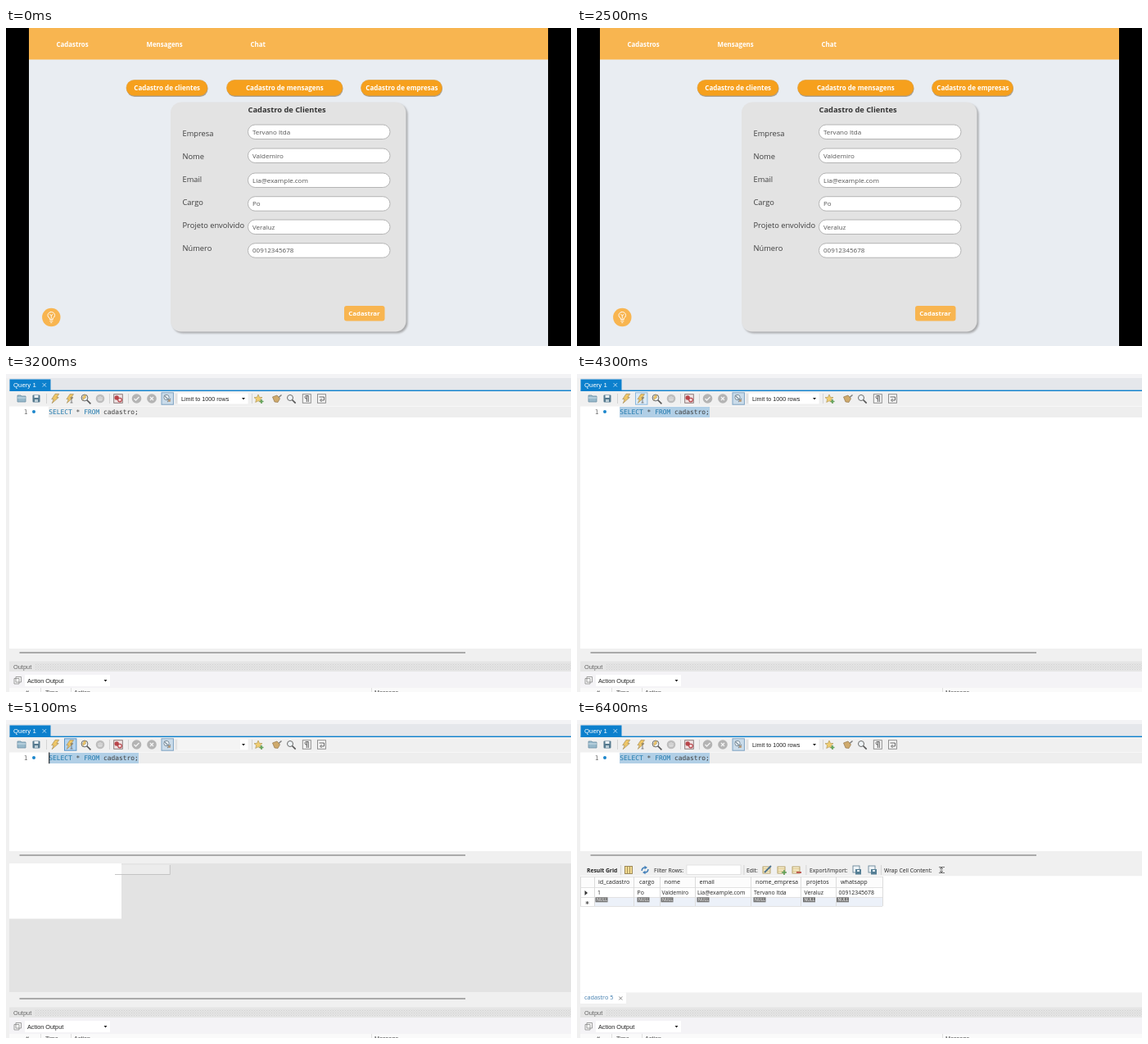
An HTML page for the animation above (6600 ms loop, 690x388 px).

```html
<!DOCTYPE html>
<html lang="pt">
<head>
<meta charset="utf-8">
<title>Cadastro</title>
<style>
html, body { margin: 0; width: 100%; height: 100%; overflow: hidden; background: #000; }
svg { display: block; width: 100%; height: 100%; }
text { white-space: pre; }
.ui { font-family: "Open Sans", "Noto Sans", sans-serif; }
.win { font-family: "Liberation Sans", Arial, sans-serif; }
.code { font-family: "DejaVu Sans Mono", monospace; }
.b { font-weight: 700; }
</style>
</head>
<body>
<svg id="stage" viewBox="0 0 690 388" xmlns="http://www.w3.org/2000/svg"></svg>
<script>
const LOOP = 6600;
const person = 'Valdemiro', company = 'Tervano ltda', mail = 'Lia@example.com',
  project = 'Veraluz', phone = '00912345678';

const rect = (x, y, w, h, fill, more = '') =>
  `<rect x="${x}" y="${y}" width="${w}" height="${h}" fill="${fill}" ${more}/>`;
const text = (x, y, size, fill, str, cls = 'ui') =>
  `<text x="${x}" y="${y}" font-size="${size}" fill="${fill}" class="${cls}">${str}</text>`;
const path = (d, stroke, width = 1, fill = 'none') =>
  `<path d="${d}" stroke="${stroke}" stroke-width="${width}" fill="${fill}"/>`;
const circle = (x, y, r, fill, more = '') =>
  `<circle cx="${x}" cy="${y}" r="${r}" fill="${fill}" ${more}/>`;
const group = (id, body) => `<g id="${id}">${body}</g>`;
const at = (x, y, body) => `<g transform="translate(${x} ${y})">${body}</g>`;

/* Registration form */
function pill(x, w, tx, label) {
  return rect(x + .5, 65, w, 19, '#a9a49d', 'rx="9.5"') +
    rect(x, 63.5, w, 19, '#f6a01d', 'rx="9.5" stroke="#dc9a35" stroke-width=".6"') +
    text(tx, 75.6, 8, '#fff', label, 'ui b');
}

function field(label, value, labelY, y) {
  return text(215.5, labelY, 9.3, '#3d3d3d', label) +
    rect(295.5, y - 8.5, 173.5, 17.5, '#fff', 'rx="8.7" stroke="#b4b4b4" stroke-width="1"') +
    text(301, y + 3, 8, '#555', value);
}

function form() {
  const fields = [
    ['Empresa', company, 131.5, 126.5], ['Nome', person, 159.5, 155.5],
    ['Email', mail, 187.5, 185.5], ['Cargo', 'Po', 215.7, 214.2],
    ['Projeto envolvido', project, 244, 242.5], ['Número', phone, 272, 271.2]
  ];
  const bulb = path('M-2 3V1.6C-6.2-1-4-6 0-6S6.2-1 2 1.6V3Z', '#fff', 1) +
    path('M-2 5H2M-1 7H1M0 2V-2L-2-3M0-2L2-3', '#fff', .9);
  return rect(0, 0, 690, 388, '#000') + rect(28, 0, 634, 388, '#e9edf2') +
    rect(28, 0, 634, 38.5, '#f8b550') +
    text(61.5, 23, 7.9, '#fff', 'Cadastros', 'ui b') +
    text(171.5, 23, 7.9, '#fff', 'Mensagens', 'ui b') +
    text(298.5, 23, 7.9, '#fff', 'Chat', 'ui b') +
    pill(147, 99, 156.3, 'Cadastro de clientes') +
    pill(269.5, 141.5, 293, 'Cadastro de mensagens') +
    pill(433.5, 99, 439.3, 'Cadastro de empresas') +
    rect(203, 92.5, 287.5, 280, '#a8a9ab', 'rx="13" filter="url(#soft)"') +
    rect(201, 90.5, 287.5, 280, '#e3e3e3', 'rx="13"') +
    text(295.5, 103.2, 9.3, '#333', 'Cadastro de Clientes', 'ui b') +
    fields.map(f => field(...f)).join('') +
    group('focus', rect(294.7, 261, 175, 20, 'none', 'rx="10" stroke="#222" stroke-width="1.2"')) +
    group('fieldCaret', rect(350.6, 265, .9, 13, '#222')) +
    rect(413, 339, 49.5, 18.5, '#f8b550', 'rx="3"') +
    text(418.3, 351, 7.8, '#fff', 'Cadastrar', 'ui b') +
    circle(55.3, 353, 11.2, '#f8b550') + at(55.3, 352.5, bulb);
}

/* Query window */
const bolt = (s = 1) => `<path transform="scale(${s})" d="M0-6H5L2-1.5H4.5L-4 6L-1.8.8H-4.5Z" fill="#efc666" stroke="#a08a58" stroke-width=".7"/>`;
const lens = (x, y, r) => circle(x, y, r, '#eef3f6', 'stroke="#6a6a6a" stroke-width="1"') +
  path(`M${x + r * .7} ${y + r * .7}L${x + r * 1.9} ${y + r * 1.9}`, '#555', 1.6);
const plate = (x, fill, stroke) => rect(x - 7, 22.8, 14.4, 14.4, fill, `stroke="${stroke}" stroke-width="1"`);
const sep = (x, y) => rect(x, y - 6, .8, 12, '#cdcdcd');
const arrow = (x, y) => `<path d="M${x - 2} ${y - 1}h4l-2 2.4z" fill="#222"/>`;
const sheet = rect(-5, -5.3, 10, 10.6, '#f4f4f4', 'stroke="#858585" stroke-width=".9"');

function toolbar() {
  const icons = [
    [19, path('M-5-4H-1L0-3H5V4H-5Z', '#6b8fa3', .8, '#97b9cb') + path('M-5-1H5', '#cfe1ea', 1)],
    [37, rect(-4.5, -4.5, 9, 9, '#55798e', 'rx="1"') + rect(-2.5, -4, 5, 3, '#e9f0f4') + rect(-2, 1, 4, 3, '#b9ccd6')],
    [60, bolt(.95)],
    [96.5, lens(-.5, -1, 3.9) + at(-1, -1, bolt(.55))],
    [115, circle(0, 0, 5.3, '#bdbdbd') + path('M-2 2V-2M0 2V-3M2 2V-2M-2 2H2', '#e6e6e6', 1)],
    [137, rect(-5.3, -5.3, 10.6, 10.6, '#efe3e3', 'stroke="#857070" stroke-width=".9"') +
      circle(-1.8, -1, 2.7, '#b9454a') + circle(2, 1.6, 2.3, '#f3dcdc', 'stroke="#b23a40" stroke-width="1.1"')],
    [159.5, circle(0, 0, 5.8, '#b4b4b4') + path('M-3 0L-1 2L3-2', '#f4f4f4', 1.3)],
    [178, circle(0, 0, 5.8, '#b4b4b4') + path('M-2-2L2 2M2-2L-2 2', '#f4f4f4', 1.3)],
    [309, path('M-1-5L.5-1.6L4-1.4L1.3 1L2.3 4.5L-1 2.8L-4.3 4.5L-3.3 1L-6-1.4L-2.5-1.6Z', '#b39a58', .7, '#f0cd70') +
      path('M3 1V6M.5 3.5H5.5', '#63a35c', 1.7)],
    [331, path('M5.5-4.5L1.5-1', '#7f7f7f', 1.6) + path('M-5.5-2L0-4L3.5 0L1 4.5L-3 4Z', '#93774d', .7, '#cfaa6c')],
    [348, lens(-1, -1, 3.5)],
    [367.3, sheet + path('M0 4V-3.5M2 4V-3.5H-1A1.8 1.8 0 0 0 0 0', '#555', .9)],
    [385.5, sheet + path('M-3-2H3V2H-1M0 0L-2 2L0 4', '#555', .9)]
  ];
  return rect(4, 21, 686, 18.5, '#f0f0f0') +
    [49, 126, 149, 207.5, 300].map(x => sep(x, 30)).join('') +
    plate(197, '#cbdcea', '#7ea3c4') +
    group('hover', plate(78.5, '#dcebf7', '#8ab8de')) +
    group('press', plate(78.5, '#b5d4ee', '#5794c8')) +
    at(78, 30, bolt(.9) + path('M2-1V5M.5-1H3.5M.5 5H3.5', '#666', .8)) +
    at(197, 30, circle(-1, -1.5, 3.2, '#e8eff4', 'stroke="#7d8f9c" stroke-width="1"') +
      path('M-4-4L3 3M0 4L4 0', '#7d8f9c', 1.1) + circle(2.5, 2.5, 1.6, '#b79a78')) +
    icons.map(([x, body]) => at(x, 30, body)).join('') +
    rect(210, 23.5, 85.5, 13, '#fff') +
    group('limit', text(214, 32.8, 7.2, '#222', 'Limit to 1000 rows', 'win')) +
    group('limitGap', rect(210, 24, 76, 12, '#f4f4f4')) + arrow(290, 30);
}

function editor() {
  const kw = s => `<tspan fill="#2079ad">${s}</tspan>`;
  return rect(4, 39.5, 686, 295.5, '#fff') + rect(52, 40, 638, 13, '#eee') +
    text(21.8, 49.2, 7.9, '#707070', '1', 'code') + circle(34, 46, 2, '#1c86cc') +
    group('selection', rect(52, 40, 110, 13, '#b1cfe6')) +
    text(52.3, 49.2, 7.92, '#3c3c3c', `${kw('SELECT')} * ${kw('FROM')} cadastro;`, 'code') +
    group('caretEnd', rect(161.4, 39.5, 1.1, 13.7, '#222')) +
    group('caretStart', rect(52.2, 39.5, 1.1, 13.7, '#222'));
}

const scroller = (y, h, lineY) => rect(4, y, 686, h, '#f0f0f0') + rect(16.5, lineY - .6, 544.5, 1.2, '#7c7c7c');

function output() {
  return rect(0, 346, 690, 42, '#f0f0f0') + rect(4, 350.5, 686, 12.5, '#e5e5e5') +
    rect(35, 353, 655, 8, 'url(#dots)') + text(9, 359.6, 7.4, '#666', 'Output', 'win') +
    rect(4, 363, 686, 25, '#f4f3f6') +
    rect(23, 367, 104, 14, '#fff') + text(26, 376.6, 7.3, '#222', 'Action Output', 'win') + arrow(121.5, 374) +
    path('M12 369.5H18.5V376H12Z M10 371.5H16V378H10Z', '#888', .8, '#fafafa') +
    rect(4, 383, 686, 5, '#fafafa') +
    [42, 79, 446].map(x => rect(x, 383, 1, 5, '#e0e0e0')).join('') +
    [[24, '#'], [48, 'Time'], [83, 'Action'], [450, 'Message']].map(([x, s]) => text(x, 391, 7.2, '#444', s, 'win')).join('');
}

/* Result panel */
const gridIcon = (x, extra = '') => at(x, 183, rect(-5, -4, 9, 8, '#faf1d2', 'stroke="#b09a5c" stroke-width=".9"') +
  path('M-5-1.3H4M-5 1.4H4', '#ccb26a', .8) + extra);
const diskIcon = x => at(x, 183, rect(-5, -5, 8, 8, '#eef4f7', 'stroke="#6b8799" stroke-width=".9"') +
  rect(-2, -1, 7, 6.5, '#557f95') + rect(0, 0, 3, 2, '#e3edf2'));

function result() {
  const cols = [
    [26, 25, 'id_cadastro', '1', 22.5], [76, 73.5, 'cargo', 'Po', 73.5], [106.5, 103.5, 'nome', person, 102.5],
    [149.5, 147, 'email', mail, 146.5], [218, 216, 'nome_empresa', company, 215.5],
    [280, 277.5, 'projetos', project, 276], [322, 319.5, 'whatsapp', phone, 317]
  ];
  const tool = (x, s, cls = 'ui') => text(x, 185.6, 6.75, '#222', s, cls);
  const badge = x => rect(x, 216.3, 15, 6, '#757575') + text(x + 1.4, 221.3, 5.2, '#fff', 'NULL', 'win');
  return scroller(160, 15.5, 165) + rect(4, 175, 686, 15.5, '#f0f0f0') +
    tool(12, 'Result Grid', 'ui b') + sep(53, 183) +
    at(63, 183, rect(-4.5, -4.5, 9, 9, '#f5dc93', 'stroke="#94814f" stroke-width=".9"') + path('M-1.5-4V4M1.5-4V4', '#94814f', .8)) +
    at(83, 183, path('M-3.8 1A3.6 3.6 0 0 1 0-3M3.8-1A3.6 3.6 0 0 1 0 3', '#4682ba', 1.5) +
      path('M-.5-5.3L3-3L-.5-.7ZM.5 5.3L-3 3L.5.7Z', 'none', 0, '#4682ba')) +
    tool(94, 'Filter Rows:') + rect(134, 177, 66, 11.3, '#fff', 'stroke="#dadada" stroke-width=".7"') +
    sep(203.5, 183) + tool(207, 'Edit:') +
    gridIcon(232, path('M-3 3L5-5', '#4c7290', 1.8)) + gridIcon(250, path('M3 0V6M0 3H6', '#5d9f58', 1.6)) +
    gridIcon(268, path('M0 3H6', '#bd4d48', 1.8)) +
    sep(279.5, 183) + tool(284, 'Export/Import:') + diskIcon(342) + diskIcon(361) +
    sep(371, 183) + tool(375, 'Wrap Cell Content:') +
    at(445, 183, path('M-3-3.5H4M-3 3.5H4M0-3V3M-2-1L0-3L2-1M-2 1L0 3L2 1', '#666', .9)) +
    rect(4, 190.5, 686, 142, '#fff') + rect(4, 191, 369, 13, '#fcfcfc') + rect(21, 216, 352, 11, '#ecf1f9') +
    [191, 204, 216, 227].map(y => rect(4, y, 369, 1, '#e2e2e2')).join('') +
    [4, 21, 69, 101, 144, 212, 273, 316, 373].map(x => rect(x, 191, 1, 36, '#dcdcdc')).join('') +
    cols.map(([hx, x, head, value, nx]) => text(hx, 200.2, 7.2, '#222', head) + text(x, 213.2, 6.9, '#222', value) + badge(nx)).join('') +
    path('M9.5 208L13 211L9.5 214Z', 'none', 0, '#333') +
    path('M10.5 223H14.5M12.5 221V225M11 221.5L14 224.5M14 221.5L11 224.5', '#444', .7) +
    rect(4, 332.5, 686, 14, '#f0f0f0') + rect(4, 332.5, 56, 13.5, '#fff') +
    text(9, 341.4, 7.3, '#3f7cae', 'cadastro 5') + path('M51.3 337.5L55.3 341.5M55.3 337.5L51.3 341.5', '#777', .9);
}

function loading() {
  return scroller(160, 15, 165) + rect(4, 175, 686, 157, '#e3e3e3') + rect(4, 175, 137, 67.5, '#fff') +
    rect(133, 176.5, 67, 12, '#ececec') + path('M133 188.5H200.3V177', '#bcbcbc', .8) +
    rect(133, 175, 8, 13, '#fff') + scroller(332, 14, 340);
}

function bench() {
  return rect(0, 0, 690, 388, '#f0f0f0') + rect(0, 0, 690, 5, '#f3f3f5') + rect(4, 5, 686, 15, '#e5e7eb') +
    rect(4.5, 6.5, 50, 14, '#0c80cd') + rect(4.5, 19.6, 685.5, 1.4, '#0c80cd') +
    text(9, 15.7, 7.8, '#fff', 'Query 1', 'win') + path('M44.6 11.2L49 15.6M49 11.2L44.6 15.6', '#b8dcf4', 1) +
    toolbar() + editor() + scroller(335, 11, 340) +
    group('loading', loading()) + group('result', result()) + output();
}

const stage = document.getElementById('stage');
stage.innerHTML = `<defs>
  <filter id="soft"><feGaussianBlur stdDeviation="1.1"/></filter>
  <pattern id="dots" width="3" height="3" patternUnits="userSpaceOnUse">${rect(0, 0, 1, 1, '#d0d0d0') + rect(1.5, 1.5, 1, 1, '#d0d0d0')}</pattern>
</defs>` + group('form', form()) + group('bench', bench());

/* Spans in ms during which each part is visible */
const shown = {
  form: [[0, 2600]],
  focus: [[1100, 2500]],
  fieldCaret: [[1100, 1600], [2100, 2500]],
  bench: [[2600, LOOP]],
  caretEnd: [[2600, 2900], [5900, 6400]],
  selection: [[3600, LOOP]],
  caretStart: [[3600, 4300], [4800, 5200]],
  hover: [[4300, 4800]],
  press: [[4800, 5200]],
  limit: [[0, 5100], [5200, LOOP]],
  limitGap: [[5100, 5200]],
  loading: [[5100, 5200]],
  result: [[5200, LOOP]]
};
const parts = Object.entries(shown).map(([id, spans]) => [document.getElementById(id), spans]);

function draw(t) {
  for (const [el, spans] of parts)
    el.style.display = spans.some(([from, to]) => t >= from && t < to) ? '' : 'none';
}

const start = performance.now();
function tick() {
  draw((performance.now() - start) % LOOP);
  requestAnimationFrame(tick);
}
tick();
</script>
</body>
</html>
```
